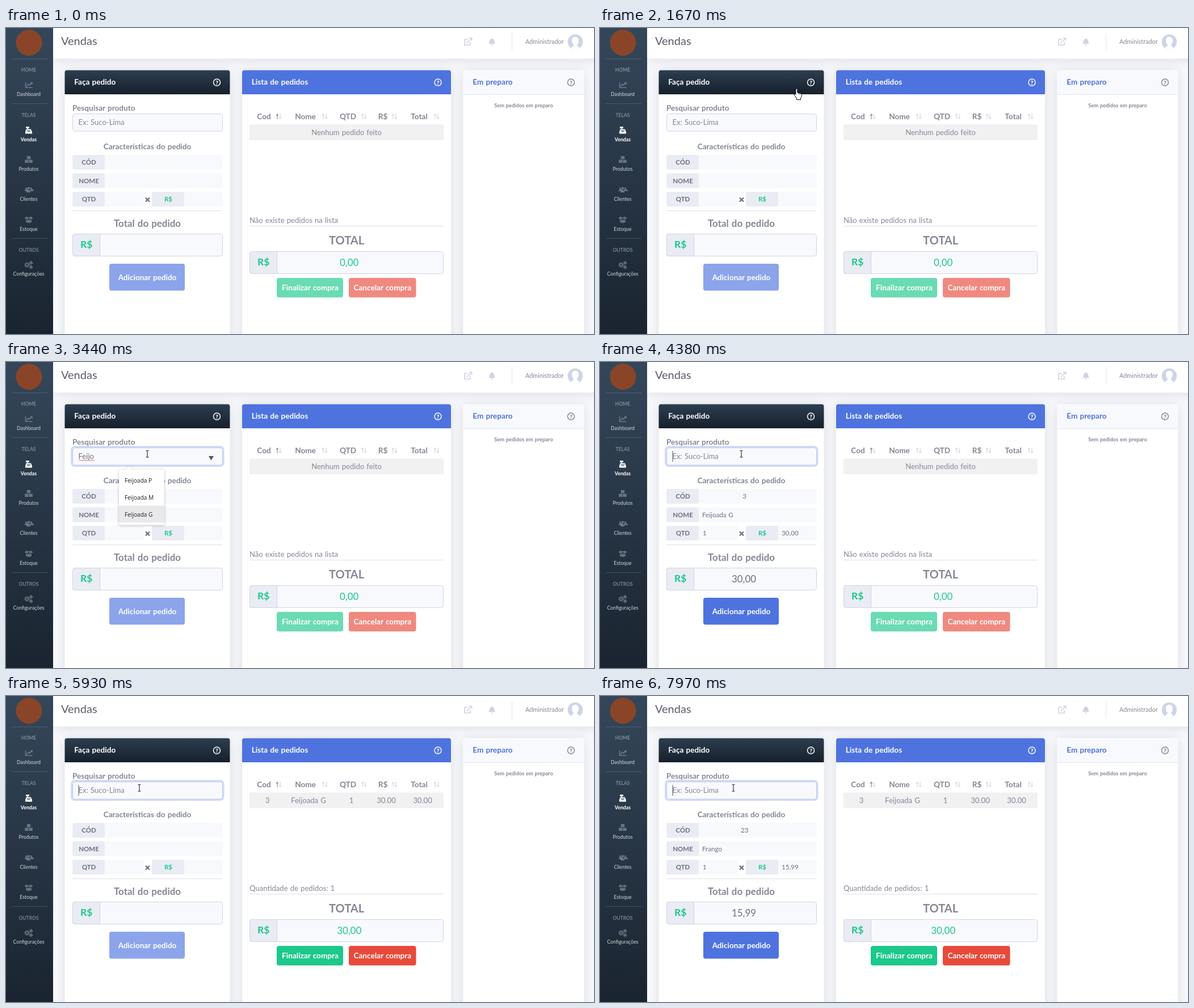
An HTML page for the animation above (8 s loop, 1036 by 540 pixels).

```html
<!DOCTYPE html>
<html lang="pt">
<head>
<meta charset="utf-8">
<title>Vendas</title>
<style>
  html, body { margin: 0; width: 100%; height: 100%; overflow: hidden; background: #f8f9fc; }
  svg { display: block; }
  text { font-family: Lato, sans-serif; word-spacing: .06em; white-space: pre; }
  .menu { font-family: "Open Sans", sans-serif; word-spacing: 0; }
  .card { filter: drop-shadow(0 2px 10px #3a3b4526); }
</style>
</head>
<body>
<svg width="1036" height="540" viewBox="0 0 1036 540">
  <defs>
    <linearGradient id="dark" x2="0" y2="1"><stop stop-color="#2c3e50"/><stop offset="1" stop-color="#17202c"/></linearGradient>
    <linearGradient id="side" x2="0" y2="1"><stop stop-color="#34475a"/><stop offset="1" stop-color="#1a2430"/></linearGradient>
  </defs>
  <g id="page"></g>
  <g id="live"></g>
</svg>
<script>
const LOOP = 8000;
const GRAY = '#858796', DARK = '#6e707e', GREEN = '#1cc88a', BLUE = '#4e73df', RED = '#e74a3b';
const LIGHT = '#f8f9fc', LABEL = '#eaecf4', LINE = '#d1d3e2';
const page = document.getElementById('page'), live = document.getElementById('live');

// Drawing helpers
const text = (s, x, y, size, fill = GRAY, weight = 400, anchor = 'start', extra = '') =>
  `<text x="${x}" y="${y}" font-size="${size}" fill="${fill}" font-weight="${weight}" text-anchor="${anchor}" ${extra}>${s}</text>`;
const mid = (s, x, y, size, fill, weight) => text(s, x, y, size, fill, weight, 'middle');
const rect = (x, y, w, h, fill, r = 0, extra = '') =>
  `<rect x="${x}" y="${y}" width="${w}" height="${h}" rx="${r}" fill="${fill}" ${extra}/>`;
const path = (d, fill = 'none', stroke = 'none', width = 1, extra = '') =>
  `<path d="${d}" fill="${fill}" stroke="${stroke}" stroke-width="${width}" ${extra}/>`;
const circle = (x, y, r, fill, extra = '') => `<circle cx="${x}" cy="${y}" r="${r}" fill="${fill}" ${extra}/>`;
const hline = (x, y, w, color) => rect(x, y, w, 1, color);

// Timing helpers
const at = (steps, t) => steps.reduce((v, [time, value]) => t >= time ? value : v, steps[0][1]);
const ramp = (t, start, length) => Math.max(0, Math.min(1, (t - start) / length));
const within = (t, a, b) => t >= a && t < b;

function sidebar() {
  const icon = '#ffffff4d';
  const gear = (x, y, r) => circle(x, y, r, 'none', `stroke="${icon}" stroke-width="2"`) +
    circle(x, y, r + 1.5, 'none', `stroke="${icon}" stroke-width="1.4" stroke-dasharray="1.6 1.7"`);
  const person = (x, y, k) => circle(x, y, 2.2 * k, icon) +
    path(`M${x - 3.6 * k} ${y + 6.5 * k}q0-3.6 3.6-3.6t3.6 3.6z`, icon);
  const icons =
    path('M34.5 96v9h12M36 103l3.5-4 2 2 4-4.5M43 96.5h3v3', 'none', icon, 1.6) +
    path('M35 174h6v3h-2v1.5h5l2 5v3H34v-3l1.5-5h2V177H35z', '#fff') +
    path('M36.5 181h7M37.5 183h5', 'none', '#34475a', 1) +
    rect(36.8, 226, 6.4, 5.6, icon, .6) + rect(33.2, 232.4, 6.4, 5.6, icon, .6) + rect(40.4, 232.4, 6.4, 5.6, icon, .6) +
    person(35.5, 283, .75) + person(44.5, 283, .75) + person(40, 283, 1.1) +
    path('M34.5 333l5.5 1 5.5-1 1.6 3.6-4.6 1.4-2.5-3-2.5 3-4.6-1.4zM35 338.5l3 .8 2-2 2 2 3-.8v4.3l-5 1.4-5-1.4z', icon) +
    gear(37, 418, 2.5) + gear(44, 414.5, 1.3) + gear(44, 422, 1.3);
  const heads = [['HOME', 77], ['TELAS', 156.5], ['OUTROS', 394.5]];
  const links = [['Dashboard', 120], ['Vendas', 199.5], ['Produtos', 251.5], ['Clientes', 304.5], ['Estoque', 358], ['Configurações', 437]];
  return rect(0, 0, 83, 540, 'url(#side)') + circle(40.5, 26, 23, '#8a4528') +
    [54, 133, 371].map(y => hline(10, y, 63, '#ffffff26')).join('') +
    heads.map(([s, y]) => mid(s, 40, y, 8.5, '#ffffff66', 700)).join('') +
    links.map(([s, y]) => mid(s, 40, y, 8.8, s === 'Vendas' ? '#fff' : '#ffffffcc', s === 'Vendas' ? 700 : 400)).join('') + icons;
}

function topbar() {
  return `<g class="card">${rect(83, -20, 973, 74, '#fff')}</g>` +
    text('Vendas', 97, 30, 20, '#5a5c69') +
    path('M814 20h-6v10h10v-5M811.5 27l8.5-8.5M816 18.2h4.6v4.6', 'none', LINE, 1.7) +
    path('M850 28q2-2 2-5t4-4.2v-1h.6v1q3.600 1 3.600 4.200t2 5zM854.400 29.200h3.600q-.4 2-1.800 2t-1.800-2z', LINE) +
    rect(891, 9, 1, 31, '#e3e6f0') +
    text('Administrador', 915, 27.5, 10.9) +
    circle(1003, 24.5, 13.3, '#ccd5e8') +
    path('M996 36q0-3.500 4-4.500v-2q-3-3-3-7.500 0-6.500 6-6.500t6 6.500q0 4.500-3 7.500v2q4 1 4 4.500-7 4-14 0z', '#fff');
}

function card(x, w, title, fill, ink, helpInk = ink) {
  const hx = x + w - 23;
  return `<g class="card">${rect(x, 74.5, w, 500, '#fff', 4)}</g>` +
    path(`M${x} 117v-38.500q0-4 4-4h${w - 8}q4 0 4 4v38.500z`, fill) +
    text(title, x + 16.8, 100, 13.6, ink, 700) +
    circle(hx, 96, 6, 'none', `stroke="${helpInk}" stroke-width="1.500"`) + mid('?', hx, 99.7, 10, helpInk, 900);
}

function moneyBox(x, y, w) {
  return rect(x + .5, y, w, 39, LIGHT, 4) +
    path(`M${x + 48.500} ${y}h-44q-4 0-4 4v31q0 4 4 4h44z`, LABEL, LINE) +
    rect(x + .5, y, w, 39, 'none', 4, `stroke="${LINE}"`) + mid('R$', x + 24.7, y + 24.500, 17.5, GREEN, 700);
}

function field(label, x, y, w, ink = DARK) {
  return rect(x, y, w, 26, LIGHT, 3) + rect(x, y, 57, 26, LABEL, 3) + mid(label, x + 29, y + 17, 11.5, ink, 700);
}

function sortIcon(x, active) {
  return path(`M${x + 2} 161v-9m-2 2.500l2-2.500 2 2.500`, 'none', active ? GRAY : '#d5d6dc', 1.1) +
    path(`M${x + 7} 151v9m-2-2.500l2 2.500 2-2.500`, 'none', '#d5d6dc', 1.1);
}

function staticPage() {
  const columns = [['Cod', 454.5, 476], ['Nome', 527.5, 557], ['QTD', 602.5, 626], ['R$', 664, 680], ['Total', 728, 754]];
  return topbar() + sidebar() +
    card(103.500, 291, 'Faça pedido', 'url(#dark)', '#fff') +
    card(416, 368, 'Lista de pedidos', BLUE, '#fff') +
    card(805.500, 213, 'Em preparo', LIGHT, BLUE, GRAY) + hline(805.500, 117, 213, '#e3e6f0') +
    mid('Sem pedidos em preparo', 912, 140, 9.27, GRAY, 700) +
    text('Pesquisar produto', 117, 145.500, 13.6, GRAY, 700) +
    mid('Características do pedido', 249, 214, 13.6, GRAY, 700) +
    field('CÓD', 117, 224, 265) + field('NOME', 117, 256.500, 265) + field('QTD', 117, 289, 126) +
    field('R$', 257, 289, 125, GREEN) +
    path('M246 299.500l7 7m0-7l-7 7', 'none', DARK, 2.4) +
    hline(117, 322, 264, '#dddfe8') + mid('Total do pedido', 249, 351, 16.9, GRAY, 700) + moneyBox(117, 363.500, 264) +
    columns.map(([s, x, icon], i) => mid(s, x, 161, 13.6, GRAY, 700) + sortIcon(icon, !i)).join('') +
    rect(429, 170.500, 342, 27.500, '#f1f1f2') + hline(429, 349, 342, '#dddfe8') +
    mid('TOTAL', 600, 382, 20, GRAY, 700) + moneyBox(429, 394.500, 341);
}

// Pointer track: time, x, y of the hot spot
const track = [[80, 980, 135], [240, 600, 97], [440, 293, 110], [650, 530, 181], [1669, 530, 181], [1670, 347, 107],
  [1750, 300, 98], [1830, 255, 140], [1870, 249, 162], [4910, 249, 162], [5150, 240, 448], [5310, 240, 448],
  [5610, 240, 447], [5850, 235, 162]];

function pointer(t, enabled) {
  if (t < track[0][0]) return '';
  const i = track.findIndex(p => p[0] > t);
  let [, x, y] = track.at(-1);
  if (i > 0) {
    const [a, b] = [track[i - 1], track[i]], k = ramp(t, a[0], b[0] - a[0]);
    x = a[1] + (b[1] - a[1]) * k;
    y = a[2] + (b[2] - a[2]) * k;
  }
  const inForm = x > 104 && x < 394;
  const onHead = y > 74 && y < 117 && (inForm || (x > 416 && x < 784) || x > 805);
  const onButton = enabled && y > 416 && y < 464 && x > 182 && x < 315;
  let shape;
  if (onHead || onButton)
    shape = path('M-1.500 1q1.500-2 3 0v6l6 1.500q1.500.5 1.500 2.500-.2 4-1.700 6v2.500h-7.300v-2.500l-4.500-6q0-2 2-1.500l1 1z', '#fff', '#000', 1) +
      path('M3.500 7.500v3M6 8.200v2.500', 'none', '#000', .8);
  else if (inForm && y > 151 && y < 183)
    shape = path('M-2.500-5.500h2l.5.500.5-.5h2M0-5v10.500M-2.500 6h2l.5-.5.5.5h2', 'none', '#222', 1.1);
  else
    shape = path('M0 0v16l3.700-3.500 2.600 6 2.500-1.100-2.600-5.700h5z', '#fff', '#000', 1);
  return `<g transform="translate(${x.toFixed(1)} ${y.toFixed(1)})">${shape}</g>`;
}

const typing = [[0, ''], [2300, 'F'], [2400, 'Fe'], [2600, 'Fei'], [2760, 'Feij'], [2880, 'Feijo'], [3690, 'Feijoada G'], [4050, ''],
  [6290, 'F'], [6370, 'Fr'], [6450, 'Fra'], [6530, 'Fran'], [6610, 'Frang'], [6690, 'Frango'], [7650, '']];
const caret = [[0, 0], [1910, 1], [3190, 0], [3690, 1], [4050, 0], [4380, 1], [4730, 0], [5080, 1], [5270, 0],
  [5890, 1], [6990, 0], [7330, 1], [7650, 0], [7970, 1]];
const selection = [[0, -1], [3190, 0], [3320, 1], [3440, 2], [3690, -1], [7030, 0], [7330, -1]];

function search(t) {
  const glow = Math.max(ramp(t, 1870, 80) * (t < 5270), ramp(t, 5850, 80));
  const value = at(typing, t);
  return rect(115.500, 149.500, 267.500, 34, 'none', 5.500, `stroke="${BLUE}" stroke-width="3" stroke-opacity="${.25 * glow}"`) +
    rect(117.500, 151.500, 264, 30.500, LIGHT, 4, `stroke="${glow > .5 ? '#bac8f3' : LINE}"`) +
    text(value || 'Ex: Suco-Lima', 127.500, 171, 13.1, value ? DARK : GRAY, 400, 'start', 'id="value"') +
    (value ? path('M357 166h9l-4.500 7.500z', '#555') : '') +
    (within(t, 3190, 3690) ? path('M128 173.500q1-2 2 0' + 't2 0'.repeat(13), 'none', RED, 1) : '') +
    (at(caret, t) ? rect(127.500, 157, 1, 19, '#555', 0, 'id="caret"') : '');
}

function suggestions(t) {
  const first = within(t, 2400, 3690);
  if (!first && !within(t, 6370, 7330)) return '';
  const items = first ? ['Feijoada P', 'Feijoada M', 'Feijoada G'] : ['Frango'];
  const w = first ? 80 : 74, h = 9 + 29.700 * items.length, chosen = at(selection, t);
  return `<g style="filter:drop-shadow(0 1px 2px #0004)">${rect(199, 189.500, w, h, '#fff', 2)}${path('M211 190l6-6 6 6z', '#fff')}</g>` +
    (chosen >= 0 ? rect(199, 194 + 29.800 * chosen, w, 29.700, '#e9e9eb') : '') +
    items.map((s, i) => text(s, 209, 213 + 30 * i, 10.1, '#222', 400, 'start', 'class="menu"')).join('');
}

function order(t) {
  const item = within(t, 4050, 5310) ? ['3', 'Feijoada G', '30,00'] : t >= 7650 ? ['23', 'Frango', '15,99'] : null;
  const hover = ramp(t, 5110, 100) * (1 - ramp(t, 5310, 40));
  const label = mid('Adicionar pedido', 249, 444.500, 13.5, '#fff', 700);
  const values = item ? mid(item[0], 254.7, 241, 11.7, DARK) + text(item[1], 180, 273.500, 11.7, DARK) +
    text('1', 181, 306, 11.7, DARK) + text(item[2], 320, 306, 11.7, DARK) + mid(item[2], 253.500, 389, 16.9, DARK) : '';
  return values + `<g transform="translate(248.500 440) scale(${1 + .1 * hover}) translate(-248.500 -440)">` +
    rect(182, 416, 133, 47.500, BLUE, 4, `opacity="${item ? 1 : .65}"`) +
    rect(182, 416, 133, 47.500, '#2653d4', 4, `opacity="${hover}"`) + label + '</g>';
}

function list(t) {
  const filled = t >= 5310, opacity = `opacity="${filled ? 1 : .65}"`;
  const row = [['3', 460.500], ['Feijoada G', 533], ['1', 608.500], ['30.00', 670], ['30.00', 734]];
  return (filled ? row.map(([s, x]) => mid(s, x, 189, 13.2)).join('') : mid('Nenhum pedido feito', 600, 189, 13.1)) +
    text(filled ? 'Quantidade de pedidos: 1' : 'Não existe pedidos na lista', 429, 344, 13.1) +
    mid(filled ? '30,00' : '0,00', 604.700, 419.500, 16.9, GREEN) +
    rect(477, 441, 117, 34.500, GREEN, 4, opacity) + mid('Finalizar compra', 536, 462.500, 13.6, '#fff', 700) +
    rect(604, 441, 118.500, 34.500, RED, 4, opacity) + mid('Cancelar compra', 663.300, 462.500, 13.6, '#fff', 700);
}

let shown = '';
function draw(now) {
  const t = now % LOOP;
  const enabled = within(t, 4050, 5310) || t >= 7650;
  const markup = list(t) + order(t) + search(t) + suggestions(t) + pointer(t, enabled);
  if (markup !== shown) {
    live.innerHTML = shown = markup;
    const bar = document.getElementById('caret');
    if (bar && at(typing, t)) bar.setAttribute('x', 128 + document.getElementById('value').getComputedTextLength());
  }
  requestAnimationFrame(draw);
}

page.innerHTML = staticPage();
const start = performance.now();
draw(0);
function tick() { draw(performance.now() - start); }
requestAnimationFrame = (original => () => original(tick))(requestAnimationFrame.bind(window));
</script>
</body>
</html>
```
